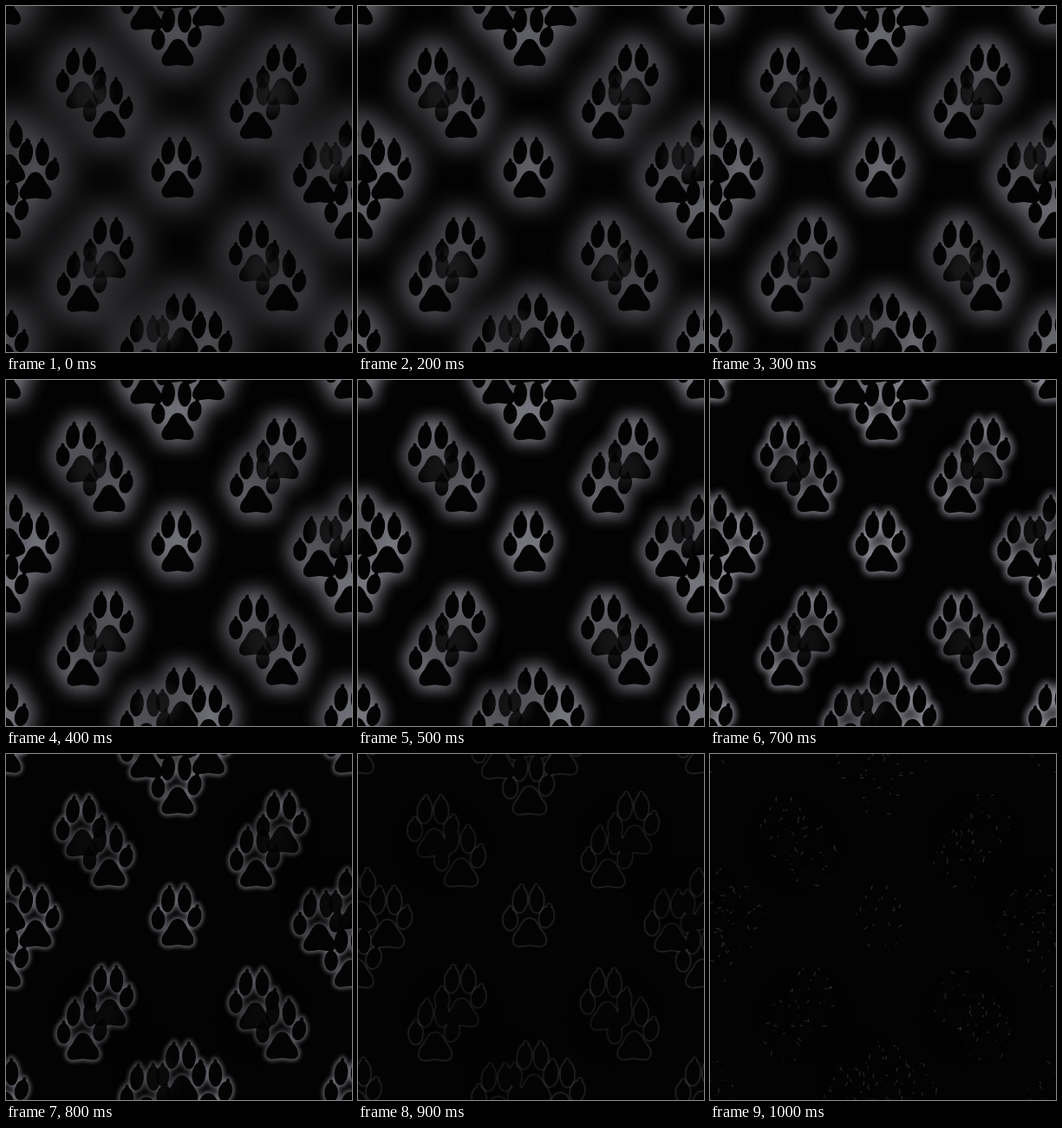
An HTML page for the animation above (1.1 s loop, 399 by 399 pixels).

```html
<!DOCTYPE html>
<html lang="en">
<head>
<meta charset="utf-8">
<title>Glowing paw prints</title>
<style>
  html, body { margin: 0; width: 100%; height: 100%; overflow: hidden; background: #030303; }
  svg { display: block; width: 100vw; height: 100vh; }
  #glow { fill: #8a8a94; stroke: #8a8a94; stroke-linejoin: round; }
  #prints { fill: #030303; }
  #sparks { fill: none; stroke: #46464a; stroke-width: .7; stroke-dasharray: 3 11 1 17 5 23; }
</style>
</head>
<body>
<svg viewBox="0 0 399 399">
  <defs>
    <g id="paw">
      <path d="M0-16C7-16 9-9 12-4C16 1 20 6 18 12C14 18 7 14 0 14C-7 14-14 18-18 12C-20 6-16 1-12-4C-9-9-7-16 0-16Z"/>
    </g>
    <radialGradient id="soft">
      <stop offset="0" stop-opacity=".5"/>
      <stop offset=".5" stop-opacity=".4"/>
      <stop offset="1" stop-opacity="0"/>
    </radialGradient>
    <mask id="fade" maskUnits="userSpaceOnUse" x="-80" y="-80" width="560" height="560">
      <rect x="-80" y="-80" width="560" height="560" fill="#fff"/>
      <g id="thin" fill="url(#soft)"></g>
    </mask>
  </defs>
  <g id="glow"></g>
  <g id="veil" fill="url(#soft)" opacity=".65"></g>
  <g id="prints"></g>
  <g id="sparks"></g>
</svg>
<script>
  const SIZE = 399, HALF = SIZE / 2, STEP = 100, LAST = 10;
  const byId = id => document.getElementById(id);
  const [paw, glow, veil, thin, prints, sparks] =
    ["paw", "glow", "veil", "thin", "prints", "sparks"].map(byId);

  const add = (parent, name, attrs) => {
    const el = document.createElementNS("http://www.w3.org/2000/svg", name);
    for (const key in attrs) el.setAttribute(key, attrs[key]);
    return parent.appendChild(el);
  };

  // Toe and claw, standing on the toe's centre
  const addToe = (x, y, tilt, length) => {
    const toe = add(paw, "g", { transform: `translate(${x} ${y}) rotate(${tilt})` });
    add(toe, "ellipse", { rx: 7.9, ry: length });
    add(toe, "ellipse", { cy: .5 - length, rx: 2.2, ry: 4 });
  };
  addToe(-22.5, -15, 0, 11.8);
  addToe(-11, -37.5, 6, 14);
  addToe(8, -37.5, -1, 14.2);
  addToe(19.5, -18, 14, 11.8);

  // The pattern repeats on a centred lattice: every point returns half a tile across and down
  const onLattice = ([px, py], draw) => {
    for (let i = -2; i <= 2; i++)
      for (let j = -2; j <= 2; j++) {
        const x = px + i * HALF, y = py + j * HALF;
        const near = Math.min(x, y) > -65 && Math.max(x, y) < SIZE + 65;
        if ((i + j) % 2 === 0 && near) draw(x, y);
      }
  };

  const paws = [
    [198, 206], [88, 103], [119, 137], [319, 99], [288.5, 138],
    [198, 54], [162, 12.5], [233.5, 8], [203, 386.5]
  ];
  for (const point of paws)
    onLattice(point, (x, y) => {
      const print = { href: "#paw", x, y };
      add(glow, "use", print);
      add(add(prints, "g", { mask: "url(#fade)" }), "use", print);
      add(sparks, "use", { ...print, "stroke-dashoffset": (x * 7 + y * 3) % 60 });
    });

  // Overlapping prints are translucent and their glow is dimmer
  const overlaps = [[97, 104], [307, 102], [177, 374]];
  for (const point of overlaps)
    onLattice(point, (cx, cy) => {
      add(thin, "circle", { cx, cy, r: 30 });
      add(veil, "circle", { cx, cy, r: 58 });
    });

  // The glow shrinks step by step, brightening until it thins out
  const show = step => {
    const left = LAST - step;
    glow.style.strokeWidth = 2.1 * left + "px";
    glow.style.filter = `blur(${20 * (left / LAST) ** 1.25}px)`;
    glow.style.opacity = Math.min(.58 + .055 * step, .36 * left);
    thin.style.opacity = left / LAST;
    sparks.style.opacity = left ? 0 : 1;
  };

  let shown = -1;
  const tick = () => {
    const step = Math.floor(performance.now() / STEP) % (LAST + 1);
    if (step !== shown) show(shown = step);
    requestAnimationFrame(tick);
  };
  tick();
</script>
</body>
</html>
```
